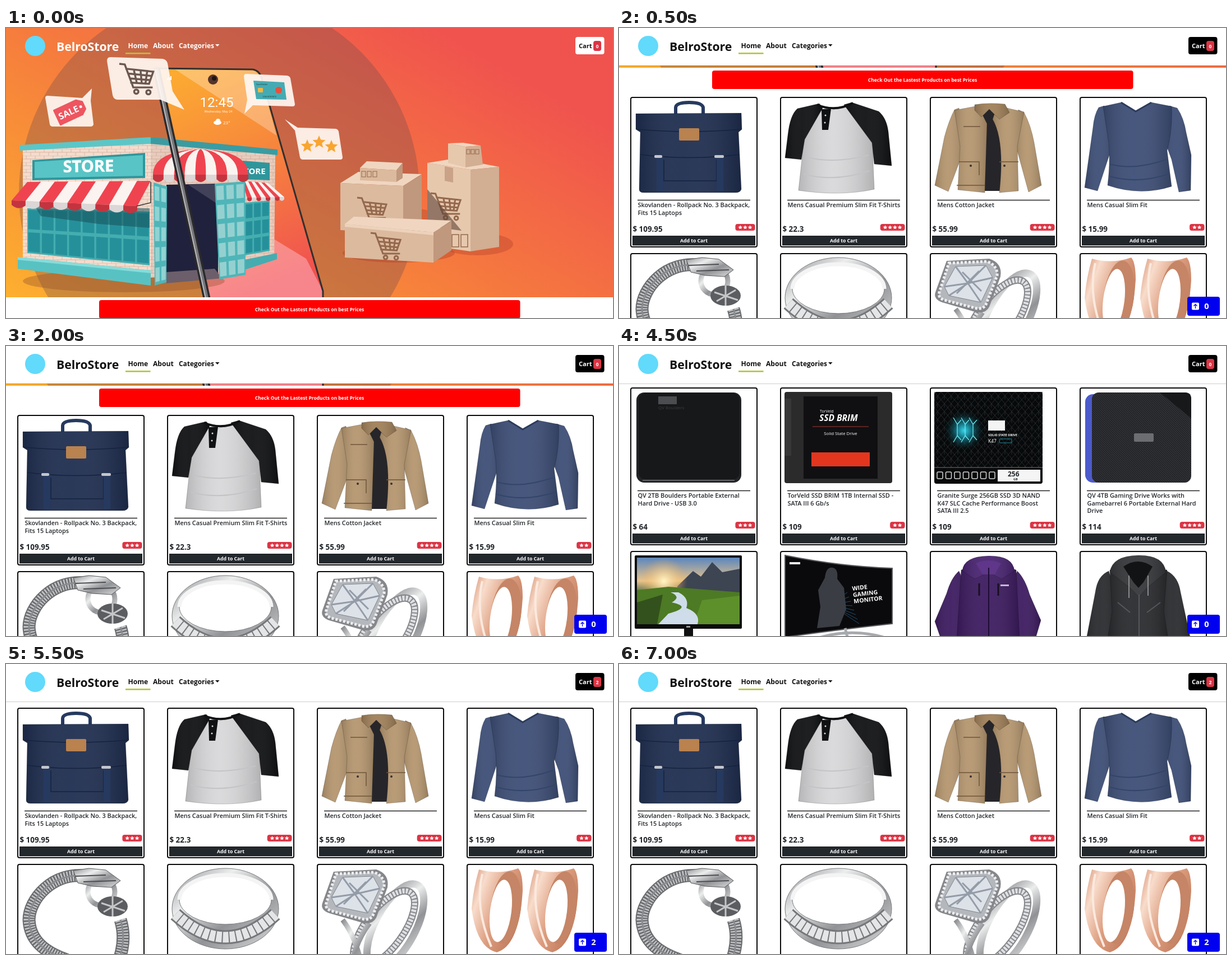
Animation, 1082 px wide and 518 px high, one loop 8 s. Source, as an HTML page:

```html
<!DOCTYPE html>
<html lang="en">
<head>
<meta charset="utf-8">
<title>Store</title>
<style>
  html, body { margin: 0; width: 100%; height: 100%; overflow: hidden; background: #fff; }
  svg { display: block; width: 100vw; height: 100vh; }
  text { font-family: "Open Sans", "Noto Sans", sans-serif; fill: #212529; }
  .b { font-weight: 700; }
  .m { font-weight: 600; }
  .w { fill: #fff; }
  .top #bar, .top #up { visibility: hidden; }
  #nav .ink { fill: #111; }
  .top #nav .ink { fill: #fff; }
  #cart { fill: #000; }
  .top #cart { fill: #fff; }
  #nav .cart { fill: #fff; }
  .top #nav .cart { fill: #111; }
</style>
</head>
<body>
<svg id="stage" viewBox="0 0 1082 518">
  <defs>
    <linearGradient id="sky" gradientUnits="userSpaceOnUse" x1="-209" y1="364" x2="190" y2="-330">
      <stop stop-color="#fdb02f"/><stop offset=".5" stop-color="#f67f3c"/><stop offset="1" stop-color="#f0534e"/>
    </linearGradient>
    <linearGradient id="screen" gradientUnits="userSpaceOnUse" x1="290" y1="90" x2="460" y2="470">
      <stop stop-color="#fcaa32"/><stop offset=".35" stop-color="#f88e3a"/><stop offset="1" stop-color="#f0524f"/>
    </linearGradient>
    <linearGradient id="silver" x2="1" y2="1">
      <stop stop-color="#8b8d90"/><stop offset=".3" stop-color="#eceded"/><stop offset=".6" stop-color="#909295"/><stop offset="1" stop-color="#dcddde"/>
    </linearGradient>
    <linearGradient id="rose" x2="1" y2=".6">
      <stop stop-color="#d58f70"/><stop offset=".25" stop-color="#f8dccb"/><stop offset=".6" stop-color="#dc9c7e"/><stop offset="1" stop-color="#c07a5b"/>
    </linearGradient>
    <linearGradient id="dusk" x2="0" y2="1">
      <stop stop-color="#5b86bd"/><stop offset=".35" stop-color="#e9c48b"/><stop offset=".5" stop-color="#6b7a55"/><stop offset="1" stop-color="#2f4a1d"/>
    </linearGradient>
    <linearGradient id="cloth" x2="1"><stop stop-color="#000" stop-opacity=".16"/><stop offset=".45" stop-color="#fff" stop-opacity=".05"/><stop offset="1" stop-color="#000" stop-opacity=".18"/></linearGradient>
    <radialGradient id="glow"><stop stop-color="#35d5e8"/><stop offset=".35" stop-color="#14707f"/><stop offset="1" stop-color="#060809" stop-opacity="0"/></radialGradient>
    <radialGradient id="sun"><stop stop-color="#fff6c8"/><stop offset="1" stop-color="#f6a94a" stop-opacity="0"/></radialGradient>
    <pattern id="brick" width="16" height="12" patternUnits="userSpaceOnUse">
      <rect width="16" height="12" fill="#f3dccd"/><path d="M0 0H16M0 6H16M4 0V6M12 6V12" stroke="#dcb7a5"/>
    </pattern>
    <pattern id="hex" width="12" height="14" patternUnits="userSpaceOnUse">
      <path d="M0 0L6 7L12 0M6 7V14M0 14L6 7L12 14" stroke="#25292c" fill="none"/>
    </pattern>
    <pattern id="rib" width="4" height="4" patternUnits="userSpaceOnUse"><path d="M-1 -1L5 5" stroke="#3b3c3f"/></pattern>
    <g id="trolley" fill="none" stroke-width="3.2">
      <path d="M0 0L9 1L23 39H55M10 8L56 13L49 33L18 31M14 16L53 20M17 24L51 27M24 10L29 32M35 11L37 32M46 12L43 33"/>
      <circle cx="28" cy="46" r="3.5"/><circle cx="48" cy="47" r="3.5"/>
    </g>
    <clipPath id="heroBox"><path d="M0 0H1082V481H0Z"/></clipPath>
  </defs>
  <g id="page"></g>
  <g id="nav"></g>
</svg>
<script>
const $ = id => document.getElementById(id);
const lerp = (a, b, t) => a + (b - a) * t;
const range = n => [...Array(n).keys()];
const each = (n, f) => range(n).map(f).join('');

const poly = (pts, fill, more = '') => `<polygon points="${pts}" fill="${fill}" ${more}/>`;
const path = (d, fill, more = '') => `<path d="${d}" fill="${fill}" ${more}/>`;
const line = (d, color, width = 1, more = '') => path(d, 'none', `stroke="${color}" stroke-width="${width}" ${more}`);
const rect = (x, y, w, h, fill, r = 0, more = '') =>
  `<rect x="${x}" y="${y}" width="${w}" height="${h}" rx="${r}" fill="${fill}" ${more}/>`;
const oval = (x, y, rx, ry, fill, more = '') => `<ellipse cx="${x}" cy="${y}" rx="${rx}" ry="${ry}" fill="${fill}" ${more}/>`;
const disc = (x, y, r, fill, more) => oval(x, y, r, r, fill, more);
const text = (x, y, size, str, cls = '', more = '') => `<text x="${x}" y="${y}" font-size="${size}" class="${cls}" ${more}>${str}</text>`;
const group = (transform, body) => `<g transform="${transform}">${body}</g>`;
const mid = 'text-anchor="middle"';
const star = (x, y, r, fill) => poly(range(10).map(i => {
  const a = i * Math.PI / 5, d = i % 2 ? r * .45 : r;
  return [(x + d * Math.sin(a)).toFixed(1), (y - d * Math.cos(a)).toFixed(1)];
}).join(' '), fill);

// Quads are corner lists: top left, top right, bottom right, bottom left.
const at = (q, u, v) => [0, 1].map(k => lerp(lerp(q[k], q[k + 2], u), lerp(q[k + 6], q[k + 4], u), v));
const cell = (q, u0, v0, u1, v1, fill) => poly([at(q, u0, v0), at(q, u1, v0), at(q, u1, v1), at(q, u0, v1)].join(' '), fill);
const panes = (q, nx, ny, frame, glass, gap = .1) => poly(q, frame) + each(nx * ny, i => {
  const x = i % nx, y = Math.floor(i / nx);
  return cell(q, (x + gap) / nx, (y + gap) / ny, (x + 1 - gap) / nx, (y + 1 - gap) / ny, glass);
});
const scallop = ([x0, y0], [x1, y1], d, fill) =>
  path(`M${x0} ${y0}L${x1} ${y1}v${d}Q${(x0 + x1) / 2} ${(y0 + y1) / 2 + 2.3 * d} ${x0} ${y0 + d}Z`, fill);
const awning = (q, n, d) => each(n, i => {
  const a = i / n, b = (i + 1) / n;
  return cell(q, a, 0, b, 1, i % 2 ? '#fbf3f0' : '#ef4450') + scallop(at(q, a, 1), at(q, b, 1), d, i % 2 ? '#dcd6d6' : '#c3343f');
});
const trolley = (x, y, s, color) => `<use href="#trolley" transform="translate(${x} ${y}) scale(${s})" stroke="${color}"/>`;
const box = (top, front, side, light = '#dcba9e', dark = '#c0987d') => poly(top, '#f0d6c0') + poly(front, light) + poly(side, dark);

function store() {
  const domeX = i => 262 + 170 * i / 9;
  return oval(210, 452, 180, 20, '#8a4a2c', 'opacity=".35"')
    + poly('30,216 258,204 258,446 30,424', 'url(#brick)')
    + poly('258,204 480,224 478,412 425,432 258,446', 'url(#brick)')
    + poly('258,204 480,224 478,412 425,432 258,446', '#8a5a48', 'opacity=".12"')
    + poly('24,209 258,195 258,207 24,219', '#5cc6c7') + poly('258,195 484,217 484,227 258,207', '#3a9ca2')
    + poly('47,236 248,223 248,268 47,272', '#2e969b') + poly('51,239 244,227 244,264 51,268', '#58c4c5')
    + text(147, 257, 29, 'STORE', 'b w', mid + ' stroke="#fff" stroke-width=".5" transform="rotate(-1 147 250)"')
    + panes([38, 322, 256, 328, 256, 424, 38, 402], 9, 2, '#43adb0', '#26909a', .07)
    + poly('50,316 256,322 256,357 165,350 62,336', '#17505c', 'opacity=".55"')
    + awning([38, 275, 258, 273, 234, 318, 10, 308], 9, 8)
    + line('M233 318L258 312V275', '#333', 1.5)
    + poly('21,409 258,433 258,460 21,430', '#58c2c3') + poly('21,409 258,433 258,438 21,414', '#86dcd9')
    + poly('422,237 470,241 470,272 422,270', '#2e969b') + text(424, 261, 15, 'TORE', 'b w')
    + panes([426, 312, 470, 308, 470, 398, 426, 406], 3, 3, '#43adb0', '#26909a')
    + awning([420, 273, 467, 277, 496, 302, 430, 303], 8, 4)
    + poly('425,414 483,402 483,413 425,432', '#46acb0')
    + poly('286,280 378,278 378,440 286,437', '#20213c') + poly('325,280 378,279 378,315', '#fff', 'opacity=".15"')
    + poly('286,436 372,430 385,447 286,456', '#6c5f6b')
    + panes([263, 276, 287, 283, 286, 454, 265, 460], 2, 5, '#4fb5b8', '#90d3d3', .15)
    + panes([372, 278, 426, 274, 427, 441, 380, 449], 3, 5, '#4fb5b8', '#95d0d0', .13)
    + each(9, i => path(`M347 216Q${domeX(i)} 220 ${domeX(i)} 262L${domeX(i + 1)} 262Q${domeX(i + 1)} 220 347 216Z`, i % 2 ? '#fbf3f0' : '#ef4450')
      + scallop([domeX(i), 262], [domeX(i + 1), 262], 8, i % 2 ? '#dcd6d6' : '#c3343f'));
}

function phone() {
  return path('M264 72L440 74Q452 76 456 90L565 470V481H355Z', 'url(#screen)')
    + poly('300,73 440,74 454,86 482,192', '#fff', 'opacity=".28"')
    + poly('322,282 535,412 565,470 565,481 360,481', '#ffc4d4', 'opacity=".45"')
    + line('M264 72L440 74Q452 76 456 90L565 470V481', '#33302f', 3)
    + disc(369, 92, 9, '#55342a') + disc(371, 90, 4, '#1f1513')
    + text(375.5, 141, 24, '12:45', 'w', mid + ' style="font-family:Roboto,sans-serif"')
    + text(378.5, 151, 5.4, 'Wednesday, May 24', 'w', mid)
    + oval(377, 169, 7, 4, '#fff') + disc(378, 166, 4, '#fff') + text(387, 172, 8, '23°', 'w');
}

const phoneSide = () => line('M268 73L358 483', '#2b2a2c', 13) + line('M268 73L358 483', '#77777b', 6) + line('M266 73L356 483', '#b9b9bc', 2);

function bubbles() {
  const bubble = d => path(d, '#fff8f2', 'opacity=".92"');
  return bubble('M186 52L279 55Q286 56 288 63L297 113L318 146L275 128L199 128Q192 128 190 120L180 59Q180 52 186 52Z')
    + trolley(202, 64, 1.08, '#6a5750') + line('M288 93v-3M291 93v-5M294 93v-7', '#fff', 2)
    + bubble('M74 121L136 125L153 108L151 130L156 172Q155 176 151 176L83 176Q79 176 78 172L70 125Q70 121 74 121Z')
    + group('translate(115 149) rotate(-25)', path('M-26 -14H17L26 -7V7L17 14H-26Z', '#ee5560', 'stroke="#ee5560" stroke-width="3" stroke-linejoin="round"')
      + disc(20, 0, 2.5, '#fff8f2') + text(-4, 6, 16, 'SALE', 'b w', mid))
    + bubble('M428 82L501 85Q506 86 507 90L515 136Q515 140 511 140L440 138L425 153L430 128L424 87Q424 82 428 82Z')
    + poly('441,94 496,97 500,128 446,127', '#45abb3') + rect(449, 107, 9, 8, '#f6b63e', 1) + disc(486, 111, 6, '#e8503c')
    + text(446, 102, 3.6, 'Card Holder') + text(457, 124, 3.4, '1234 5678 9012')
    + bubble('M497 163L520 178L588 180Q592 181 593 185L600 231Q600 235 596 235L529 235Q525 235 524 231L515 183Z')
    + star(537, 211, 12, '#f8a530') + star(558, 204, 12, '#f8a530') + star(580, 212, 12, '#f8a530');
}

function boxes() {
  const brown = '#94684d', pale = '#e6c8ad', tan = '#d2ae92';
  return oval(840, 386, 64, 20, '#b5432c', 'opacity=".4"') + oval(700, 402, 100, 17, '#b5432c', 'opacity=".45"')
    + oval(735, 345, 35, 22, '#a94a2e', 'opacity=".4"')
    + box('596,277 628,257 741,261 708,282', '596,277 708,282 708,366 596,361', '708,282 741,262 741,345 708,366')
    + trolley(626, 303, .93, brown)
    + box('631,250 643,238 707,241 696,254', '631,250 696,254 696,275 631,272', '696,254 707,241 707,268 696,275')
    + each(3, i => rect(634 + i * 10, 256, 7, 10, 'none', 0, `stroke="${brown}"`))
    + box('751,241 800,233 879,248 828,253', '751,241 828,253 828,399 751,388', '828,253 879,248 879,391 828,399', pale, tan)
    + poly('782,247 797,250 797,276 782,273', '#c9a287')
    + trolley(757, 295, .95, brown) + poly('751,288 812,362 751,354', '#5e4237', 'opacity=".6"')
    + box('788,206 815,205 846,210 819,212', '788,206 819,212 819,249 788,241', '819,212 846,210 850,244 819,249', pale, tan)
    + each(3, i => rect(821 + i * 8, 217, 6, 8, 'none', 0, `stroke="${brown}"`))
    + each(2, i => rect(795 + i * 16, 369, 12, 22, 'none', 0, `stroke="${brown}" stroke-width="1.5"`))
    + box('604,350 620,337 794,344 762,365', '604,350 762,365 762,419 604,410', '762,365 794,345 794,397 762,419')
    + poly('604,350 762,365 762,370 604,355', '#edd2bb') + trolley(650, 366, .95, brown);
}

const hero = () => `<g clip-path="url(#heroBox)">` + rect(0, 0, 1082, 481, 'url(#sky)')
  + disc(380, 295, 357, '#6a4a50', 'opacity=".32"') + phone() + store() + phoneSide() + bubbles() + boxes() + '</g>';

const garment = (color, ...parts) => parts.map(d => path(d, color, 'stroke="#0004" stroke-width=".8"') + path(d, 'url(#cloth)')).join('');
const band = x => group(`translate(${x} 0)`, path('M14 2Q4 36 1 72Q10 142 46 150Q86 138 92 40Q92 8 84 0Q50 12 14 2Z', 'url(#rose)')
  + oval(62, 70, 27, 65, '#c58566', 'transform="rotate(7 62 70)"')
  + oval(53, 76, 19, 56, '#fff', 'transform="rotate(7 53 76)"') + line('M20 10Q6 70 36 140', '#fbe9de', 4));
const chain = d => line(d, '#696b6e', 23) + line(d, '#c2c3c5', 19, 'stroke-dasharray="2.5 2.5"') + line(d, '#8a8c8f', 3);

const pictures = {
  backpack: () => line('M73 26V11Q74 2 97 2T122 11V26', '#26395f', 6)
    + garment('#1f2e50', 'M2 22L190 21L191 50L185 55L190 157Q188 163 180 163H16Q8 163 8 157L10 55L2 50Z')
    + line('M10 95Q96 106 187 95M52 104V142H146V104M5 50Q96 58 188 50', '#152340', 1.5)
    + rect(39, 98, 12, 62, '#26395f') + rect(146, 98, 12, 62, '#26395f')
    + rect(35, 96, 14, 5, '#c3c6cb', 2) + rect(142, 96, 17, 5, '#c3c6cb', 2) + rect(79, 48, 36, 22, '#b9824f', 2),
  raglan: () => garment('#d8d8da', 'M55 8L75 18L120 6L157 50L158 112L160 157Q100 170 25 159L31 104L36 50Z')
    + garment('#101113', 'M62 4L23 13Q10 24 6 60L1 101L30 104L36 68L68 12Z', 'M120 2L168 18Q182 30 185 54L191 115L160 112L156 74L106 6Z')
    + line('M58 6Q90 20 122 3', '#101113', 4) + poly('66,14 83,13 78,51 67,51', '#101113') + disc(73, 25, 1.5, '#ddd') + disc(72, 38, 1.5, '#ddd')
    + line('M40 100Q90 112 150 96M34 130Q90 145 152 124', '#c4c4c8', 2),
  jacket: () => garment('#b5966f', 'M44 12L36 15Q26 34 18 64L1 150L25 161L54 84Z', 'M150 15L160 20Q172 42 178 74L191 150L168 162L144 74Z')
    + poly('78,14 128,14 126,160 88,160', '#26252a')
    + garment('#b5966f', 'M36 16L78 8L94 40L90 163L42 158L46 80Z', 'M112 8L160 19L148 80L150 160L116 163Q126 70 104 32Z')
    + garment('#a08059', 'M72 6Q96 2 126 5L134 20L116 32L98 14L84 28L72 16Z')
    + line('M52 45H82M44 108H80V132M116 108H150M40 150H90', '#6f5638', 1.5) + disc(65, 115, 2, '#333') + disc(125, 115, 2, '#333'),
  sweater: () => garment('#3d4e76', 'M36 8L26 11Q18 24 16 46L1 154L24 160L45 96L56 60Z', 'M152 8L166 12Q178 30 182 56L191 96L190 159L169 162L156 104L140 60Z',
    'M34 9L66 2L92 18L120 2L156 9Q158 50 148 88L156 152Q100 170 42 150Q47 108 44 74Z')
    + line('M66 2L92 18L120 2', '#2b3b5c', 3) + line('M46 112Q90 124 146 104M46 134Q96 148 150 130', '#33456a', 2),
  bracelet: () => chain('M118 14C55 4 13 56 13 92C15 140 60 160 110 172') + chain('M176 92Q188 130 170 172')
    + disc(142, 42, 24, 'none', 'stroke="url(#silver)" stroke-width="9"')
    + path('M92 4L120 0L150 3L176 22L160 34L126 32L100 26Z', 'url(#silver)', 'stroke="#55575a"') + line('M96 14L150 12M110 24L168 22', '#4c4d50', 2)
    + oval(162, 68, 27, 18, '#5b5d60') + line('M142 62L184 76M146 78L180 58M162 50V86', '#c5c6c8', 3),
  ring: () => path('M1 72A95 72 0 1 0 191 72A95 72 0 1 0 1 72ZM14 56A82 44 0 1 0 178 56A82 44 0 1 0 14 56Z', 'url(#silver)', 'fill-rule="evenodd" stroke="#77797c"')
    + line('M14 56A82 44 0 0 1 178 56', '#f4f4f5', 7) + line('M7 82Q96 164 185 82', '#75777a', 25) + line('M7 82Q96 164 185 82', '#e4e5e6', 19, 'stroke-dasharray="10 2"'),
  diamond: () => oval(132, 104, 36, 84, 'none', 'stroke="url(#silver)" stroke-width="13" transform="rotate(28 132 104)"')
    + oval(112, 108, 34, 80, 'none', 'stroke="#85878b" stroke-width="13" transform="rotate(36 112 108)"')
    + oval(112, 108, 34, 80, 'none', 'stroke="#dfe0e3" stroke-width="9" stroke-dasharray="4 2" transform="rotate(36 112 108)"')
    + line('M38 92Q60 120 72 172M86 98Q62 130 54 172', 'url(#silver)', 9)
    + path('M22 6L98 2Q122 10 118 34L98 88Q92 100 76 98L14 80Q-2 74 2 62Z', '#85878b') + path('M26 10L94 7Q113 14 112 32L92 84Q88 92 76 91L18 76Q6 72 9 62Z', '#b4b7bc', 'stroke="#eeeef0" stroke-width="5" stroke-dasharray="4 3"')
    + path('M38 16L92 14L104 36L83 80L26 68L18 52Z', '#dde2e8', 'stroke="#7f858d"')
    + line('M38 16L60 46L92 14M60 46L104 36M60 46L83 80M60 46L26 68M18 52L60 46M50 26L84 60M80 24L40 64', '#949ca8', 3),
  bands: () => band(0) + band(99),
  portable: () => rect(3, 1, 187, 161, '#222326', 14) + rect(7, 2, 180, 154, '#17181a', 12)
    + rect(42, 8, 33, 14, '#4b4d50') + text(42, 31, 8, 'QV Boulders', '', 'style="fill:#3c3e41"') + line('M14 158H178', '#77797c', 1.5),
  ssd: () => rect(0, 0, 192, 163, '#2b2b2c', 4) + rect(0, 12, 12, 102, '#373738') + rect(34, 8, 132, 147, '#101012')
    + text(63, 37, 7, 'TorVeld', 'w') + text(62, 52, 15.5, 'SSD BRIM', 'b w', 'font-style="italic"') + line('M50 62H150', '#a3382e')
    + text(100, 77, 7.8, 'Solid State Drive', 'w', mid) + rect(48, 108, 104, 25, '#e3361f'),
  chip: () => rect(0, 0, 193, 164, '#07090a', 4) + rect(0, 0, 193, 135, 'url(#hex)') + disc(53, 69, 38, 'url(#glow)')
    + each(3, i => line(`M${34 + i * 14} 46l7 12v20l-7 12m7 -32l7 -8m-7 28l7 8`, '#6fe9f4', 1.3))
    + rect(96, 51, 30, 18, '#f4f4f4') + text(96, 79, 5.6, 'SOLID STATE DRIVE', 'b w') + text(96, 91, 8.5, 'K47', 'w')
    + rect(116, 84, 22, 7, 'none', 1, 'stroke="#1e8ea0"') + line('M0 135H193', '#777')
    + each(7, i => rect(5 + i * 15.5, 143, 10, 12, 'none', 2, 'stroke="#d5d5d5" stroke-width="1.5"'))
    + rect(113, 139, 76, 21, '#f5f5f5') + text(131, 151, 12, '256', 'b') + text(141, 158, 5.5, 'GB', 'b'),
  gaming: () => rect(2, 4, 60, 158, '#4c5bcb', 14) + rect(14, 1, 177, 161, '#242528', 12) + rect(14, 1, 177, 161, 'url(#rib)', 12)
    + path('M135 1H180Q191 1 191 12V47Z', '#17181a') + rect(89, 74, 35, 15, '#6b6d70', 2),
  monitor: () => rect(0, 0, 191, 131, '#0c0c0d', 2) + rect(4, 4, 183, 119, 'url(#dusk)')
    + poly('76,55 104,28 118,38 138,12 156,30 187,24 187,68 76,68', '#3d4452') + disc(52, 46, 42, 'url(#sun)')
    + poly('4,62 60,56 187,66 187,123 4,123', '#4d7a24') + poly('4,84 50,70 40,123 4,123', '#33511c') + poly('120,80 187,72 187,123 105,123', '#5d8f2b')
    + path('M64 66Q84 74 66 84Q104 92 60 104L42 123H112Q118 104 92 94Q98 76 78 66Z', '#cfdcea') + rect(92, 126, 7, 3, '#999') + rect(88, 131, 16, 20, '#111'),
  curved: () => path('M1 0Q100 20 192 23V122Q100 132 1 146Z', '#0a0a0c', 'stroke="#55575b" stroke-width="2"')
    + each(8, i => line(`M82 88L${112 + i * 3} ${66 + i * 8}`, '#2b6b96', 1, 'opacity=".7"'))
    + path('M72 40Q74 20 86 22Q96 24 94 42L106 58L110 96L98 126L58 130L64 92L60 62Z', '#3a3d44')
    + rect(9, 12, 19, 4, '#eee') + group('translate(121 63) rotate(-7)', ['WIDE', 'GAMING', 'MONITOR'].map((s, i) => text(0, i * 11.5, 10.5, s, 'b w')).join(''))
    + line('M108 130L112 145M46 152Q112 128 176 146', '#a7a9ad', 5),
  parka: () => garment('#3d1b60', 'M44 28Q30 40 22 68L1 118L12 150H48L62 70Z', 'M148 28Q162 42 170 70L190 116L180 150H146L130 70Z', 'M48 26L96 12L146 26L152 150H40Z')
    + garment('#4a2472', 'M50 28Q52 2 96 1T143 28L120 42L97 30L72 42Z') + path('M74 14Q96 4 119 14L108 34H86Z', '#5f3689')
    + line('M97 22V150', '#1f0c36', 2) + line('M80 50V72M114 50V72', '#181020', 3) + rect(118, 52, 15, 3, '#c9b8da'),
  leather: () => garment('#2a2b2e', 'M44 28Q24 36 20 66L4 150H46L58 70Z', 'M148 28Q168 38 172 66L190 150H146L134 70Z', 'M46 26L96 22L148 26L142 100L150 150H42L50 100Z')
    + garment('#36373a', 'M46 30Q50 1 96 0T146 30L112 58L98 74L80 56Z') + path('M70 20Q96 2 122 20L106 48L97 58L88 48Z', '#121315')
    + line('M98 70V150M60 84L82 102M136 84L112 102', '#55575a', 2) + line('M80 36V76M114 36V72', '#a6a7a8', 1.5),
};

const badge = (right, y, n) => {
  const w = 9 + 8.7 * n;
  return rect(right - w, y, w, 12, '#dc3545', 4) + each(n, i => star(right - w + 8.8 + i * 8.7, y + 6.3, 4, '#fff'));
};
const card = (column, y, h, [picture, price, stars, ...lines]) => group(`translate(${20 + 267 * column} ${y})`,
  rect(1, 1, 225, h - 2, '#fff', 3, 'stroke="#0a0a0a" stroke-width="2"') + group('translate(8 8)', pictures[picture]())
  + (price ? line('M13 184.5H214', '#222', 1.4) + lines.map((s, i) => text(13.5, 197 + i * 13.6, 10.9, s, 'm')).join('')
    + text(4.5, h - 28.5, 13.4, '$ ' + price, 'b') + badge(222.5, h - 42, stars)
    + rect(4.5, h - 20.5, 218, 16.5, '#23282d', 0, 'stroke="#171b1f"') + text(113.5, h - 9, 8.7, 'Add to Cart', 'b w', mid) : ''));

const rows = [
  [533, 269, ['backpack', 109.95, 3, 'Skovlanden - Rollpack No. 3 Backpack,', 'Fits 15 Laptops'], ['raglan', 22.3, 4, 'Mens Casual Premium Slim Fit T-Shirts'],
    ['jacket', 55.99, 4, 'Mens Cotton Jacket'], ['sweater', 15.99, 2, 'Mens Casual Slim Fit']],
  [812, 269, ['bracelet'], ['ring'], ['diamond'], ['bands']],
  [1091, 282, ['portable', 64, 3, 'QV 2TB Boulders Portable External', 'Hard Drive - USB 3.0'],
    ['ssd', 109, 2, 'TorVeld SSD BRIM 1TB Internal SSD -', 'SATA III 6 Gb/s'],
    ['chip', 109, 4, 'Granite Surge 256GB SSD 3D NAND', 'K47 SLC Cache Performance Boost', 'SATA III 2.5'],
    ['gaming', 114, 4, 'QV 4TB Gaming Drive Works with', 'Gamebarrel 6 Portable External Hard', 'Drive']],
  [1383, 269, ['monitor'], ['curved'], ['parka'], ['leather']],
];

$('page').innerHTML = hero() + rect(166, 486, 750.5, 33, '#f00', 4)
  + text(541, 506, 8.5, 'Check Out the Lastest Products on best Prices', 'b w', mid)
  + rows.map(([y, h, ...items]) => items.map((item, i) => card(i, y, h, item)).join('')).join('');

$('nav').innerHTML = `<g id="bar">${rect(0, 0, 1082, 67, '#fff') + rect(0, 67, 1082, 1, '#0003')}</g>`
  + disc(52, 32, 18, '#61dafb') + text(90, 41, 21.2, 'BelroStore', 'b ink')
  + text(217.5, 35.5, 12.1, 'Home', 'b ink') + text(262, 35.5, 12.1, 'About', 'b ink') + text(308, 35.5, 11.9, 'Categories', 'b ink')
  + path('M373 29h7.5l-3.7 4Z', '#111', 'class="ink"') + rect(213, 44, 44.5, 2.6, '#b4c43a')
  + rect(1015, 16, 51.5, 31, '#000', 4, 'id="cart"') + text(1021, 35.5, 11, 'Cart', 'b cart')
  + rect(1047, 23, 14, 18, '#dc3545', 4) + text(1054, 35.5, 8.6, '0', 'b w count', mid)
  + `<g id="up">${rect(1013, 480, 58, 34, '#0000f0', 4) + rect(1021, 490.5, 13, 13, '#fff', 2) + line('M1027.5 501V493.5M1024.5 496.5L1027.5 493.5L1030.5 496.5', '#0000f0', 1.3)
    + text(1047.5, 502, 14.5, '0', 'b w count', mid)}</g>`;

const scenes = [
  { until: 500, scroll: 0, count: 0 },
  { until: 3000, scroll: 410, count: 0 },
  { until: 5500, scroll: 1017, count: 0 },
  { until: 8000, scroll: 455, count: 2 },
];
const counters = document.querySelectorAll('.count');
const start = performance.now();
function draw() {
  const time = (performance.now() - start) % 8000;
  const { scroll, count } = scenes.find(s => time < s.until);
  $('page').setAttribute('transform', `translate(0 ${-scroll})`);
  $('stage').classList.toggle('top', scroll === 0);
  counters.forEach(c => c.textContent = count);
  requestAnimationFrame(draw);
}
draw();
</script>
</body>
</html>
```
